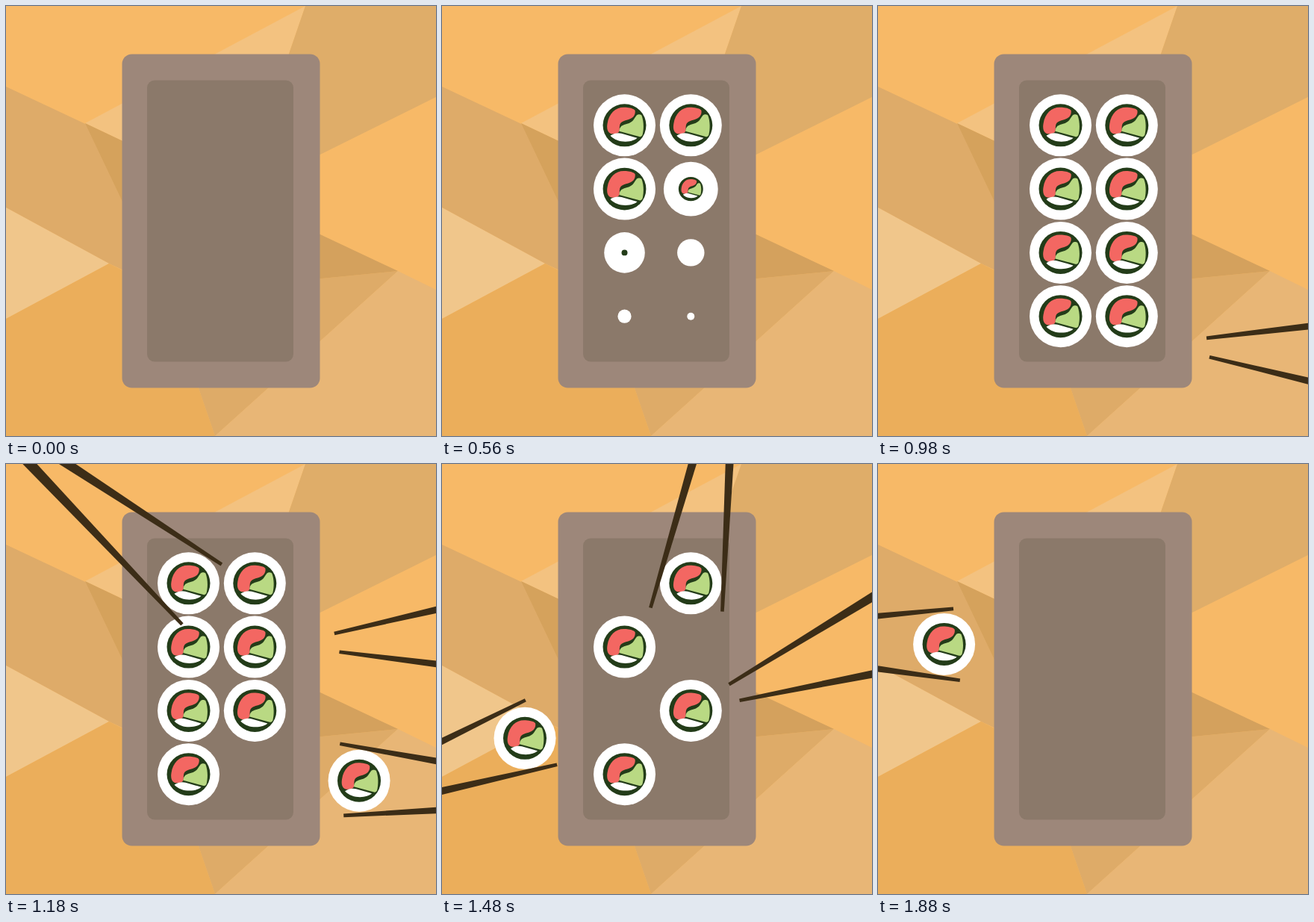
Write an HTML page that moves like this. It is 576 px wide and 576 px high and loops after 1.98 s.

```html
<!DOCTYPE html>
<html lang="en">
<head>
<meta charset="utf-8">
<title>Sushi tray</title>
<style>
html, body { margin: 0; width: 100%; height: 100%; overflow: hidden; background: #f7b967; }
svg { display: block; width: 100vw; height: 100vh; }
</style>
</head>
<body>
<svg id="stage" viewBox="0 0 576 576">
  <defs>
    <ellipse id="seaweed" rx="29" ry="28.5" fill="#233c19"/>
    <g id="filling">
      <path fill="#f36762" d="M14-20C15-16 13-12 10-10C6-7 0-7-4-4C-8-1-6 5-7 8C-9 12-15 12-19 11C-23 9-24 4-23-2C-21-16-12-24-1-24C4-24 12-23 14-20Z"/>
      <path fill="#b9d983" d="M16-13C17-15 22-15 23-13C26-5 26 5 24 13C23 15 21 16 19 15L-7 8C-7 4-5 1-2 0C2-2 7-2 11-6C13-8 14-11 16-13Z"/>
      <path fill="#fff" d="M-19 14C-14 10-8 10-4 11L17 17C11 23-9 25-19 14Z"/>
    </g>
    <path id="stick" fill="#3c2d17" d="M0-2.3L430-9V9L0 2.3Z"/>
  </defs>

  <rect width="576" height="576" fill="#f7b967"/>
  <path fill="#f3c280" d="M401 0L106 157L300 249L379 64Z"/>
  <path fill="#dfad69" d="M401 0H576V122L300 259L379 64Z"/>
  <path fill="#deab69" d="M0 108L300 249V420L138 345L0 270Z"/>
  <path fill="#d5a25c" d="M106 157L300 249L156 262Z"/>
  <path fill="#f0c68b" d="M0 270L138 345L0 419Z"/>
  <path fill="#ebae5b" d="M0 419L138 345L160 356L258 512L280 576H0Z"/>
  <path fill="#deab68" d="M258 512L300 377L525 355L280 576Z"/>
  <path fill="#d4a15d" d="M300 249L525 355L300 377Z"/>
  <path fill="#e8b676" d="M525 355L576 380V576H280Z"/>

  <rect x="155.5" y="64.5" width="265" height="447" rx="13" fill="#9d877a"/>
  <rect x="189" y="99.5" width="196" height="377" rx="10" fill="#8b796a"/>
  <g id="rolls"></g>
  <g id="sticks"></g>
</svg>
<script>
const LOOP = 1980, FIRST_GRAB = 14;

// Stick pair around its own axis: the two sticks mirror each other
const REACH = { depth: 0, skew: 2.7, gap: 12.5, tilt: 10.1 };
const HOLD = { depth: -23.3, skew: 5.4, gap: 47.8, tilt: -6.7 };

// One grab starts per step. angle points from the roll to the hand;
// reach and carry default to points along that angle.
const GRABS = [
  { roll: 7, angle: 3.5, reach: [442, 457.5] },
  { roll: 0, angle: 219.8, carry: [130.7, 93] },
  { roll: 3, angle: -3 },
  { roll: 4, angle: 170, turn: -9.6, reach: [135, 372], carry: [111, 367.3] },
  { roll: 1, angle: -80.5, slip: -12.5 },
  { roll: 5, angle: -21.3, turn: -8.8, reach: [391.5, 306], carry: [497, 251.3] },
  { roll: 6, angle: 146 },
  { roll: 2, angle: 180, turn: 1.2, slip: 6.5, reach: [179, 248.5], carry: [88.6, 241.4] }
];

const make = (tag, parent, attrs = {}) => {
  const el = document.createElementNS("http://www.w3.org/2000/svg", tag);
  for (const key in attrs) el.setAttribute(key, attrs[key]);
  return parent.appendChild(el);
};
const use = (id, parent) => make("use", parent, { href: "#" + id });
const move = (el, [x, y], rest = "") =>
  el.setAttribute("transform", `translate(${x} ${y}) ${rest}`);
const scale = (el, k) => el.setAttribute("transform", `scale(${k})`);
const show = (el, on) => el.setAttribute("display", on ? "inline" : "none");
const clamp = (v, max = 1) => Math.max(0, Math.min(max, v));
const along = ([x, y], angle, dist) => {
  const a = angle * Math.PI / 180;
  return [x + dist * Math.cos(a), y + dist * Math.sin(a)];
};

const rolls = Array.from({ length: 8 }, (_, i) => {
  const g = make("g", document.getElementById("rolls"));
  return {
    g,
    home: [244.5 + 88.8 * (i % 2), 159.8 + 85.3 * (i >> 1)],
    rice: make("circle", g, { fill: "#fff" }),
    seaweed: use("seaweed", g),
    filling: use("filling", g)
  };
});

const grabs = GRABS.map(({ roll, angle, turn = 0, slip = 0, reach, carry }) => {
  const g = make("g", document.getElementById("sticks"));
  const { home } = rolls[roll];
  return {
    g, angle, turn, slip,
    roll: rolls[roll],
    path: [reach || along(home, angle, 110), home, carry || along(home, angle, 140)],
    pair: [use("stick", g), use("stick", g)]
  };
});

// Rice grows first, then the seaweed, then the filling
function drawRoll(roll, i, step) {
  const age = step - i;
  show(roll.g, age > 0);
  roll.rice.setAttribute("r", clamp(Math.max(5, 9.1 * (age - 1)), 41.5));
  scale(roll.seaweed, clamp(0.43 * (age - 3.68)));
  scale(roll.filling, clamp(0.55 * (age - 4)));
  move(roll.g, roll.home);
}

// Phases: 0 reach in, 1 hold, 2 carry away
function drawGrab(grab, i, step) {
  const phase = step - FIRST_GRAB - i;
  const active = phase >= 0 && phase < 3;
  show(grab.g, active);
  if (phase > 2) show(grab.roll.g, false);
  if (!active) return;
  const angle = grab.angle + grab.turn * phase / 2;
  const pose = phase ? HOLD : REACH;
  move(grab.g, grab.path[phase], `rotate(${angle}) translate(${grab.slip} 0)`);
  grab.pair.forEach((stick, k) => {
    const side = k ? 1 : -1;
    move(stick, [pose.depth + side * pose.skew, side * pose.gap], `rotate(${side * pose.tilt})`);
  });
  if (phase === 2) move(grab.roll.g, grab.path[2]);
}

// Steps last 70 ms while the tray fills, 100 ms afterwards
const stepAt = t => t < 980 ? Math.floor(t / 70) : 14 + Math.floor((t - 980) / 100);

let start = null, last = -1;
function tick(now) {
  if (start === null) start = now;
  const step = stepAt(Math.max(0, now - start) % LOOP);
  if (step !== last) {
    last = step;
    rolls.forEach((roll, i) => drawRoll(roll, i, step));
    grabs.forEach((grab, i) => drawGrab(grab, i, step));
  }
  requestAnimationFrame(tick);
}
tick(performance.now());
</script>
</body>
</html>
```
